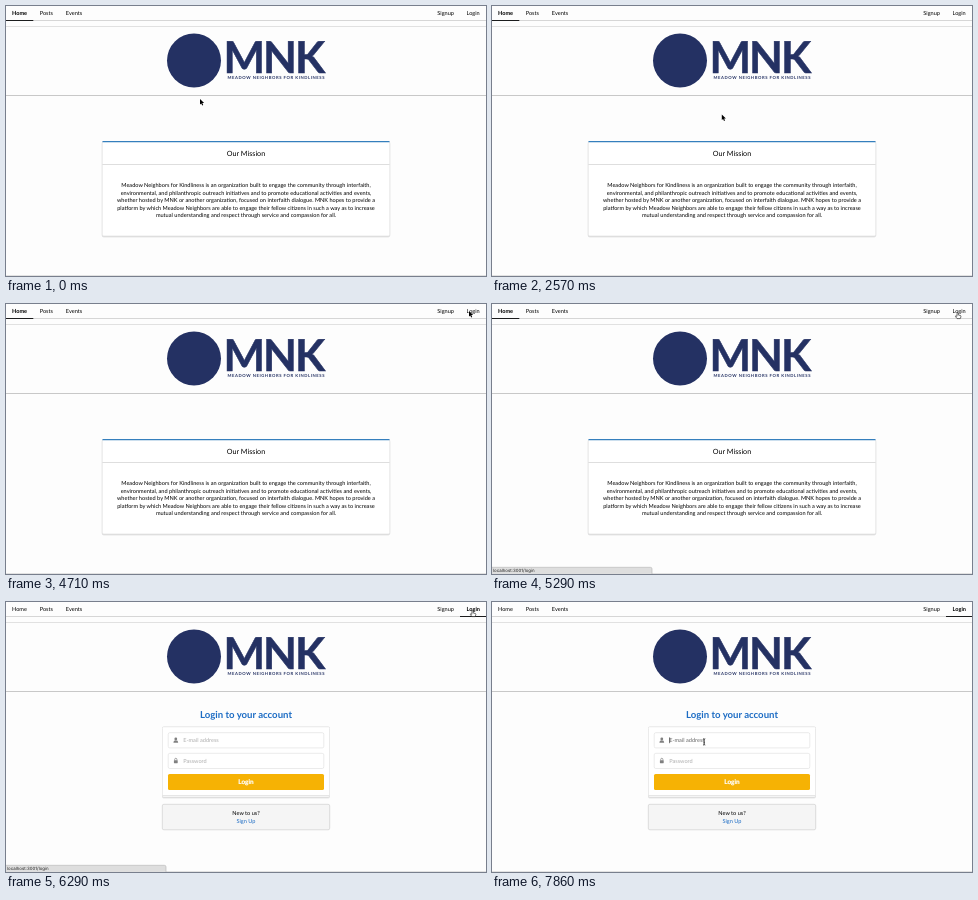
These frames come from a looping animation (480 px wide and 270 px high, 8000 ms). An HTML page:

```html
<!DOCTYPE html>
<html lang="en">
<head>
<meta charset="utf-8">
<title>Our Mission</title>
<style>
  html, body { margin: 0; width: 100%; height: 100%; overflow: hidden; background: #fdfdfd; }
  svg { display: block; width: 100vw; height: 100vh; }
  text { font: 5.6px Lato, sans-serif; fill: #000; text-rendering: geometricPrecision; }
  .mid { text-anchor: middle; }
  .bold { font-weight: 700; }
  .title { font-size: 7.2px; }
  .heading { font-size: 9.6px; font-weight: 700; fill: #1c6cc4; }
  .link { fill: #1c6cc4; }
  .navy { fill: #243163; }
  .wordmark { font-size: 44px; font-weight: 700; letter-spacing: -1.9px; stroke: #243163; stroke-width: .5; }
  .tagline { font-size: 4.2px; font-weight: 700; letter-spacing: .56px; }
  .hint { fill: #adadad; }
  .focused .hint { fill: #666; }
  .button { font-size: 6.4px; font-weight: 700; fill: #fff; stroke: #fff; stroke-width: .2; }
  .url { font: 4.4px Inter, sans-serif; fill: #222; }
  .box { fill: #fff; stroke: #d6d6d6; stroke-width: .5; }
  .rule { stroke: #d6d6d6; stroke-width: 1; }
  .icon { fill: #808080; }
  .caret { visibility: hidden; }
  .focused .caret { visibility: visible; }
</style>
</head>
<body>
<svg viewBox="0 0 480 270" preserveAspectRatio="none">
  <defs>
    <filter id="soft" x="-5%" y="-10%" width="110%" height="125%">
      <feDropShadow dx="0" dy=".7" stdDeviation=".7" flood-color="#222426" flood-opacity=".25"/>
    </filter>
  </defs>
  <rect width="480" height="270" fill="#fdfdfd"/>

  <g id="menu">
    <path class="rule" d="M0 14.5H480"/>
    <text id="home" x="6" y="8.7">Home</text>
    <text x="33.7" y="8.7">Posts</text>
    <text x="59.8" y="8.7">Events</text>
    <text x="431.3" y="8.7">Signup</text>
    <text id="login" x="460.5" y="8.7">Login</text>
    <rect id="underline" y="14" height="1" fill="#1b1c1d"/>
  </g>

  <path class="rule" d="M0 20.5H480" opacity=".7"/>
  <path d="M0 89.5H480" stroke="#c8c8c8"/>
  <circle class="navy" cx="188" cy="54.5" r="27"/>
  <text class="navy wordmark" x="217.4" y="66.8">MNK</text>
  <text class="navy tagline" x="221.6" y="73.2">MEADOW NEIGHBORS FOR KINDLINESS</text>

  <g id="missionPage">
    <rect class="box" x="96.2" y="135.4" width="287.6" height="94.6" rx="1.6" filter="url(#soft)"/>
    <path d="M96.5 135.6H383.5" stroke="#357fbd" stroke-width="1.2"/>
    <path class="rule" d="M96.4 158.5H383.6" opacity=".8"/>
    <text class="mid title" x="240" y="149.6">Our Mission</text>
    <g id="mission"></g>
  </g>

  <g id="loginPage">
    <text class="mid heading" x="240" y="116.4">Login to your account</text>
    <rect class="box" x="156.3" y="124.8" width="167.4" height="70.2" rx="1.4" filter="url(#soft)"/>
    <path class="rule" d="M156.5 193.5H323.5" opacity=".6"/>
    <g id="email">
      <rect class="box" x="162.2" y="130.7" width="155.6" height="15.2" rx="1.6"/>
      <circle class="icon" cx="169.8" cy="136.9" r="1.4"/>
      <path class="icon" d="M167.5 140.7V139.9Q167.5 138.3 169.8 138.3T172.1 139.9V140.7Z"/>
      <text class="hint" x="177.2" y="140.1">E-mail address</text>
      <path class="caret" d="M177.6 135.4V141.2" stroke="#111" stroke-width=".6"/>
    </g>
    <rect class="box" x="162.2" y="151.3" width="155.6" height="15.2" rx="1.6"/>
    <rect class="icon" x="167.9" y="158.3" width="3.8" height="2.9" rx=".4"/>
    <path d="M168.7 158.5V157.4a1.1 1.1 0 0 1 2.2 0V158.5" fill="none" stroke="#808080" stroke-width=".7"/>
    <text class="hint" x="177.2" y="160.7">Password</text>
    <rect x="162" y="172" width="156" height="16" rx="1.6" fill="#f6b204"/>
    <text class="mid button" x="240" y="182.3">Login</text>
    <rect x="156.3" y="202.3" width="167.4" height="25.5" rx="1.6" fill="#f5f5f5" stroke="#c8c8c8" stroke-width=".6"/>
    <text class="mid" x="240" y="213.2">New to us?</text>
    <text class="mid link" x="240" y="220.8">Sign Up</text>
  </g>

  <path d="M0 269.7H480" stroke="#c4c4c4" stroke-width=".6"/>
  <g id="status">
    <path d="M-1 271V263.3H158.4Q160 263.3 160 264.9V271Z" fill="#dedede" stroke="#b4b4b4" stroke-width=".6"/>
    <text class="url" x="1" y="268.3">localhost:3001/login</text>
  </g>

  <g id="pointer">
    <path id="arrow" d="M0 0V5.6L1.3 4.5L2.2 6.5L3.2 6.1L2.3 4.1H4.1Z" fill="#000" stroke="#fff" stroke-width=".5" paint-order="stroke"/>
    <path id="hand" d="M-.7 .6Q0 -.4 .6 .6V2.4L2.8 2.9Q3.4 3.2 3.2 4.2L2.6 6H-.7L-2.4 3.7Q-2.3 2.9 -.7 3.7Z" fill="#fff" stroke="#111" stroke-width=".6" stroke-linejoin="round"/>
    <path id="beam" d="M-1.1 -3.2Q0 -3.2 0 -2.4Q0 -3.2 1.1 -3.2M0 -2.4V2.4M-1.1 3.2Q0 3.2 0 2.4Q0 3.2 1.1 3.2M-.7 .9H.7" fill="none" stroke="#111" stroke-width=".7"/>
  </g>
</svg>
<script>
const LOOP = 8000, RATE = 7;
const $ = id => document.getElementById(id);
const show = (id, on) => { $(id).style.display = on ? '' : 'none'; };

const lines = [
  'Meadow Neighbors for Kindliness is an organization built to engage the community through interfaith,',
  'environmental, and philanthropic outreach initiatives and to promote educational activities and events,',
  'whether hosted by MNK or another organization, focused on interfaith dialogue. MNK hopes to provide a',
  'platform by which Meadow Neighbors are able to engage their fellow citizens in such a way as to increase',
  'mutual understanding and respect through service and compassion for all.'
];
$('mission').innerHTML = lines.map((line, i) =>
  `<text class="mid" x="240" y="${181.1 + i * 7.53}">${line}</text>`).join('');

// Pointer path: step, x, y
const path = [
  [0, 194, 93], [3, 194, 93], [5, 204, 98], [7, 222, 106], [9, 229.8, 108.5],
  [24, 229.8, 108.5], [26, 256, 98], [28, 350, 52], [30, 444, 10], [31, 460, 2], [33, 463, 7],
  [34, 464.5, 8], [39, 466.5, 9], [41, 466.5, 9], [43, 466.6, 8.6], [44, 466.6, 8.6],
  [45, 452, 18], [46, 402, 52], [47, 318, 98], [48, 240, 134], [49, 210, 143.8],
  [50, 213, 140.5], [51, 212, 139.5], [56, 212.2, 140]
];
// Status bar opacity: step, value
const fade = [[33, 0], [35, 1], [47, 1], [48, .6], [49, .12], [50, 0]];

function sample(keys, step) {
  const i = keys.findIndex(key => key[0] > step);
  if (i === 0) return keys[0].slice(1);
  if (i < 0) return keys[keys.length - 1].slice(1);
  const [from, to] = [keys[i - 1], keys[i]];
  const u = (step - from[0]) / (to[0] - from[0]);
  return from.slice(1).map((value, k) => value + (to[k + 1] - value) * u);
}

function draw(now) {
  const step = Math.floor((now % LOOP + 5) * RATE / 1000) % (LOOP * RATE / 1000);
  const onLogin = step >= 44;
  show('missionPage', !onLogin);
  show('loginPage', onLogin);
  $('home').classList.toggle('bold', !onLogin);
  $('login').classList.toggle('bold', onLogin);
  $('underline').setAttribute('x', onLogin ? 454 : 0);
  $('underline').setAttribute('width', onLogin ? 26 : 27.3);
  $('email').classList.toggle('focused', step >= 53);
  $('status').style.opacity = sample(fade, step)[0];

  const shape = step >= 50 ? 'beam' : step >= 34 && step < 45 ? 'hand' : 'arrow';
  for (const id of ['arrow', 'hand', 'beam']) show(id, id === shape);
  $('pointer').setAttribute('transform', `translate(${sample(path, step)})`);
}

const start = performance.now();
function tick() {
  draw(performance.now() - start);
  requestAnimationFrame(tick);
}
tick();
</script>
</body>
</html>
```
